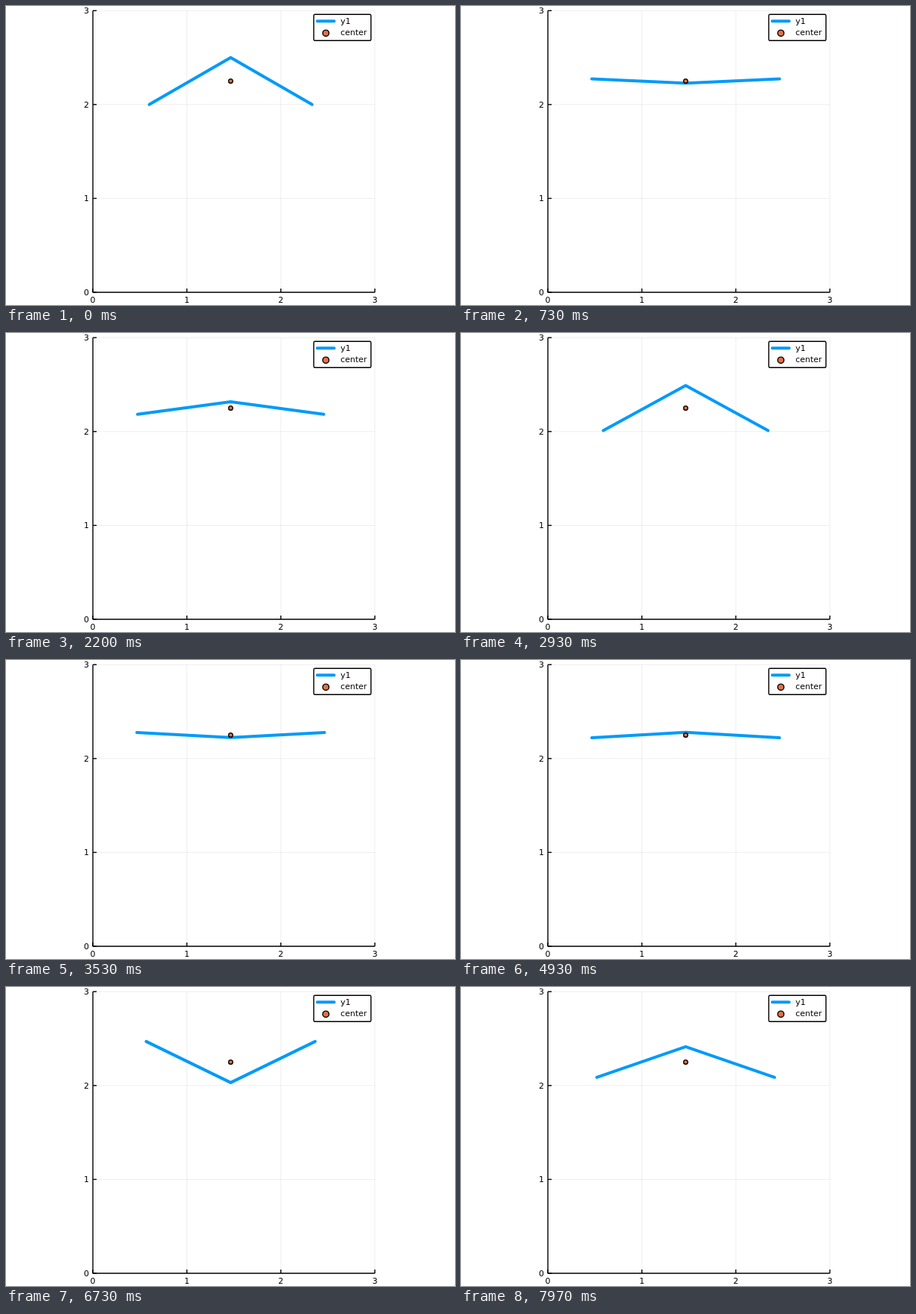
Animation, 600 px wide and 400 px high, one loop 8 s. Source, as an HTML page with a canvas:

```html
<!DOCTYPE html>
<html lang="en">
<head>
<meta charset="utf-8">
<title>Bending chain</title>
<style>
  html, body { margin: 0; width: 100%; height: 100%; overflow: hidden; background: #fff; }
  canvas { display: block; }
</style>
</head>
<body>
<canvas id="stage" width="600" height="400"></canvas>
<script>
const ctx = document.getElementById('stage').getContext('2d');
const BLUE = '#009afa', ORANGE = '#e36f47';
const UNIT = 125.6, LOOP = 8000, FRAMES = 240;
const CENTER = { x: 1.466, y: 2.25 };
const AMPLITUDE = Math.PI / 6;
const PERIOD = 83.8;   // in frames
const SKEW = 0.045;    // inertia grows with the bend, so the ends of the swing are slower

const px = x => 116.1 + x * UNIT;
const py = y => 383 - y * UNIT;

function stroke(points, color, width, cap = 'butt') {
  ctx.beginPath();
  for (const [x, y] of points) ctx.lineTo(x, y);
  ctx.strokeStyle = color;
  ctx.lineWidth = width;
  ctx.lineCap = cap;
  ctx.lineJoin = 'round';
  ctx.stroke();
}

function dot(x, y, r) {
  ctx.beginPath();
  ctx.arc(x, y, r, 0, 2 * Math.PI);
  ctx.fillStyle = ORANGE;
  ctx.fill();
  ctx.strokeStyle = '#000';
  ctx.lineWidth = 1.4;
  ctx.stroke();
}

function label(text, x, y, align) {
  ctx.font = '11px "DejaVu Sans", sans-serif';
  ctx.textAlign = align;
  ctx.fillStyle = '#000';
  ctx.fillText(text, x, y);
}

function drawAxes() {
  const left = px(0), right = px(3), top = py(3), bottom = py(0);
  for (let i = 0; i <= 3; i++) {
    const x = px(i), y = py(i);
    if (i > 0) stroke([[left, y], [right, y]], 'rgba(0,0,0,0.1)', 0.7);
    if (i > 0) stroke([[x, bottom], [x, top]], 'rgba(0,0,0,0.1)', 0.7);
    stroke([[left, y], [left + 5, y]], '#000', 1.4);
    stroke([[x, bottom], [x, bottom - 5]], '#000', 1.4);
    label(i, x, 396.5, 'center');
    label(i, 111, y + 4, 'right');
  }
  stroke([[left, top], [left, bottom], [right, bottom]], '#000', 1.4);
}

function drawLegend() {
  ctx.beginPath();
  ctx.roundRect(411.3, 11.2, 76.4, 35, 1.5);
  ctx.fillStyle = '#fff';
  ctx.fill();
  ctx.strokeStyle = '#000';
  ctx.lineWidth = 1.4;
  ctx.stroke();
  stroke([[416, 20.2], [438.5, 20.2]], BLUE, 4, 'round');
  dot(427.4, 36.3, 4.2);
  label('y1', 447, 24, 'left');
  label('center', 447, 39.4, 'left');
}

function bendAt(frame) {
  const t = 2 * Math.PI * frame / PERIOD;
  const phase = t - SKEW * Math.sin(2 * (t - SKEW * Math.sin(2 * t)));
  return AMPLITUDE * Math.cos(phase);
}

function drawChain(angle) {
  const dx = Math.cos(angle), dy = Math.sin(angle) / 2;
  const { x, y } = CENTER;
  stroke([
    [px(x - dx), py(y - dy)],
    [px(x), py(y + dy)],
    [px(x + dx), py(y - dy)]
  ], BLUE, 4, 'round');
  dot(px(x), py(y), 2.8);
}

// Steps are a thirtieth of a second, snapped to 10 ms.
function frameAt(ms) {
  let k = Math.floor(ms * FRAMES / LOOP) + 1;
  while (Math.round(k * LOOP / FRAMES / 10) * 10 > ms) k--;
  return k % FRAMES;
}

const start = performance.now();
function render() {
  const ms = Math.max(0, performance.now() - start) % LOOP;
  ctx.fillStyle = '#fff';
  ctx.fillRect(0, 0, 600, 400);
  drawAxes();
  drawChain(bendAt(frameAt(ms)));
  drawLegend();
  requestAnimationFrame(render);
}
render();
</script>
</body>
</html>
```
